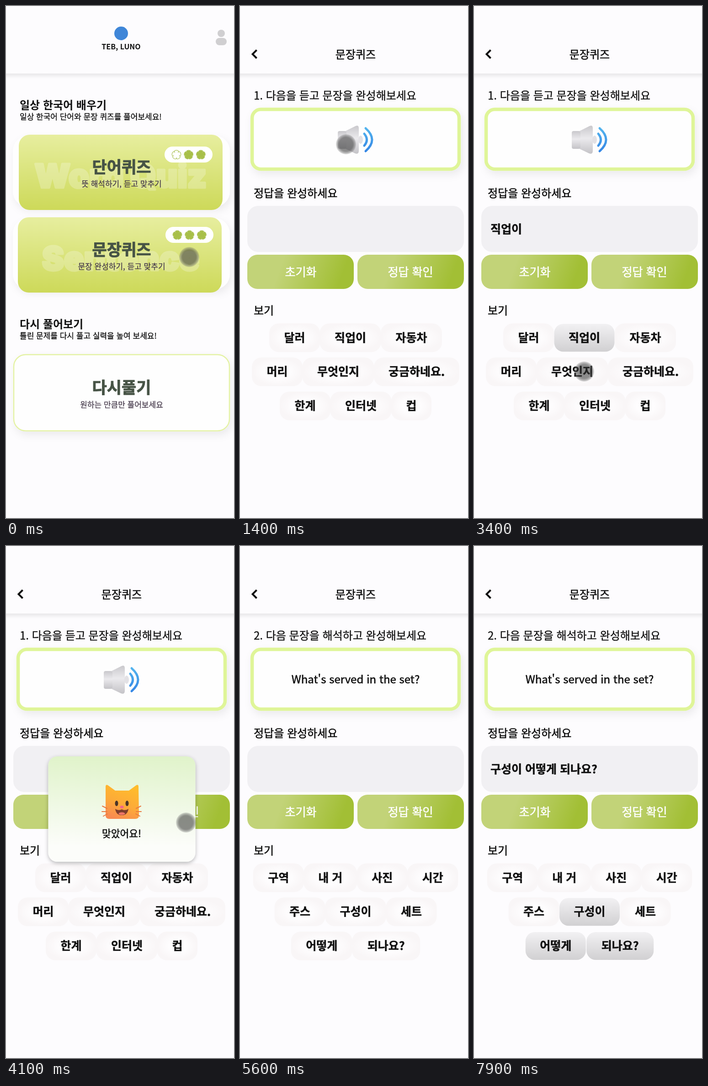
Animation of 499 by 1122 pixels, one loop 8000 ms. Source, as an HTML page:

```html
<!DOCTYPE html>
<html lang="ko">
<head>
<meta charset="utf-8">
<title>문장퀴즈</title>
<style>
  html, body { margin: 0; height: 100%; overflow: hidden; background: #fdfcfe; }
  svg { display: block; width: 100vw; height: 100vh; }
  /* a thin outline in the ink colour gives the in-between weights */
  text {
    --ink: #111; fill: var(--ink); stroke: var(--ink); stroke-width: .6; stroke-linejoin: round;
    font-family: "Noto Sans CJK KR", "Noto Sans CJK", "Noto Sans KR", sans-serif; white-space: pre;
  }
  .mid { text-anchor: middle; }
  .bold { font-weight: 700; stroke-width: 0; }
  .word { font-weight: 700; stroke-width: .5; }
  .sub { stroke-width: .35; }
  .title { font-weight: 700; stroke-width: 1; --ink: #465345; }
  .note { stroke-width: .25; --ink: #44384a; }
  .white { --ink: #fff; }
  .mark { font-family: Inter, sans-serif; font-weight: 900; --ink: #fff; stroke-width: 5; }
</style>
</head>
<body>
<svg viewBox="0 0 499 1122" preserveAspectRatio="none">
  <defs>
    <linearGradient id="lime" x2="0" y2="1"><stop stop-color="#e7ee9f"/><stop offset="1" stop-color="#cdd959"/></linearGradient>
    <linearGradient id="button" x2="1" y2=".12"><stop offset=".35" stop-color="#c2d378"/><stop offset=".95" stop-color="#a2bf35"/></linearGradient>
    <linearGradient id="picked" x2="0" y2="1"><stop stop-color="#f2f1f3"/><stop offset="1" stop-color="#d1d0d2"/></linearGradient>
    <radialGradient id="idle"><stop offset=".45" stop-color="#fefdfe"/><stop offset="1" stop-color="#f9f6f7"/></radialGradient>
    <linearGradient id="popup" x2="0" y2="1"><stop stop-color="#e0f3ca"/><stop offset=".85" stop-color="#fcfdfa"/></linearGradient>
    <linearGradient id="edge" x2="0" y2="1"><stop stop-color="#e9e8ea"/><stop offset="1" stop-color="#fdfcfe"/></linearGradient>
    <linearGradient id="cone" x2="0" y2="1"><stop stop-color="#c9c8cc"/><stop offset=".45" stop-color="#ebeaed"/><stop offset="1" stop-color="#c4c3c7"/></linearGradient>
    <linearGradient id="wave" x2="0" y2="1"><stop stop-color="#53b4ee"/><stop offset="1" stop-color="#3587e5"/></linearGradient>
    <linearGradient id="fur" x1=".7" x2=".3" y2="1"><stop stop-color="#ffbc2c"/><stop offset=".55" stop-color="#fdab38"/><stop offset="1" stop-color="#f88a50"/></linearGradient>
    <radialGradient id="tap"><stop offset=".68" stop-color="#333" stop-opacity=".56"/><stop offset=".82" stop-color="#555" stop-opacity=".5"/><stop offset="1" stop-color="#666" stop-opacity=".2"/></radialGradient>
    <filter id="soft" x="-20%" y="-30%" width="140%" height="170%"><feDropShadow dx="4" dy="8" stdDeviation="9" flood-opacity=".07"/></filter>
    <filter id="lift" x="-20%" y="-20%" width="140%" height="140%"><feDropShadow dx="0" dy="3" stdDeviation="4" flood-opacity=".28"/></filter>
  </defs>
  <rect width="499" height="1122" fill="#fdfcfe"/>
  <rect y="148" width="499" height="11" fill="url(#edge)"/>
  <g id="page"></g>
  <circle id="cursor" r="22" fill="url(#tap)"/>
</svg>
<script>
const LOOP = 8000;
const page = document.getElementById('page');
const cursor = document.getElementById('cursor');

const text = (x, y, size, str, cls = '') =>
  `<text x="${x}" y="${y}" font-size="${size}" class="${cls}">${str}</text>`;
const box = (x, y, w, h, r, fill, extra = '') =>
  `<rect x="${x}" y="${y}" width="${w}" height="${h}" rx="${r}" fill="${fill}" ${extra}/>`;

function flower(cx, cy, filled) {
  const point = (a, r) => `${(cx + r * Math.sin(a)).toFixed(1)} ${(cy - r * Math.cos(a)).toFixed(1)}`;
  const step = Math.PI / 5;
  let d = 'M' + point(-step, 6.5);
  for (let i = 0; i < 5; i++) {
    const a = i * 2 * step;
    d += `C${point(a - .62, 14)} ${point(a + .62, 14)} ${point(a + step, 6.5)}`;
  }
  return `<path d="${d}Z" fill="${filled ? '#a8bf49' : '#fff'}" stroke="#b3c765" stroke-width="1.3" stroke-linejoin="round"/>`;
}

function quizCard(x, y, mark, title, note, badgeX, badgeY, earned) {
  const flowers = [0, 1, 2].map(i => flower(badgeX + 26 + i * 26.7, badgeY + 18, i >= 3 - earned)).join('');
  return box(15, y + 2, 475, 156, 34, '#fefefe', 'filter="url(#soft)"')
    + box(x, y, 446, 165, 24, 'url(#lime)')
    + `<g opacity=".24">${text(251, y + 116, 72, mark, 'mark mid')}</g>`
    + box(badgeX, badgeY, 105, 35, 17.5, '#fff') + flowers
    + text(253, y + 84, 35, title, 'title mid') + text(253, y + 114, 17, note, 'note mid');
}

function home() {
  return '<circle cx="252" cy="60" r="15" fill="#3f86d8"/>'
    + text(252, 95, 16, 'TEB, LUNO', 'bold mid')
    + '<circle cx="471" cy="60" r="8" fill="#d0cfd1"/>' + box(459, 70, 24, 16, 8, '#d0cfd1')
    + text(30, 226, 24, '일상 한국어 배우기', 'bold')
    + text(30, 249, 17, '일상 한국어 단어와 문장 퀴즈를 풀어보세요!', 'sub')
    + quizCard(28, 282, 'Word Quiz', '단어퀴즈', '뜻 해석하기, 듣고 맞추기', 347, 308, 2)
    + quizCard(26, 463, 'Sentence', '문장퀴즈', '문장 완성하기, 듣고 맞추기', 349, 484, 3)
    + text(30, 706, 24, '다시 풀어보기', 'bold')
    + text(30, 729, 17, '틀린 문제를 다시 풀고 실력을 높여 보세요!', 'sub')
    + box(17, 764, 472, 167, 26, '#fefefe', 'stroke="#e4f2a4" stroke-width="2.5" filter="url(#soft)"')
    + text(253, 849, 35, '다시풀기', 'title mid')
    + text(253, 880, 17, '원하는 만큼만 풀어보세요', 'note mid');
}

const speaker = `
  <path d="M231 274L253 263Q260 260 260 268V317Q260 326 252 323L231 313Z" fill="url(#cone)"/>
  <rect x="214" y="274" width="19" height="39" rx="4" fill="url(#cone)"/>
  <ellipse cx="264" cy="293" rx="5" ry="9" fill="#e2e1e5"/>
  <path d="M272 280Q283 293 272 306M275 268Q303 293 275 318" fill="none" stroke="url(#wave)" stroke-width="5" stroke-linecap="round"/>`;

const QUESTIONS = [
  { label: '1. 다음을 듣고 문장을 완성해보세요', prompt: speaker,
    rows: ['달러|직업이|자동차', '머리|무엇인지|궁금하네요.', '한계|인터넷|컵'] },
  { label: '2. 다음 문장을 해석하고 완성해보세요',
    prompt: text(253, 301, 24, "What's served in the set?", 'mid'),
    rows: ['구역|내 거|사진|시간', '주스|구성이|세트', '어떻게|되나요?'] },
];

const GLYPH = { ' ': 6, '.': 7, '?': 15 };
const chipWidth = word => [...word].reduce((sum, c) => sum + (GLYPH[c] || 23), 63);

function chipRow(words, y, picked) {
  const gap = 1.5;
  let x = 253 - (words.reduce((sum, w) => sum + chipWidth(w) + gap, -gap)) / 2;
  return words.map(word => {
    const w = chipWidth(word);
    const chip = box(x, y, w, 61, 20, picked.includes(word) ? 'url(#picked)' : 'url(#idle)',
        picked.includes(word) ? '' : 'stroke="#f9f6f7" stroke-width="2"')
      + text(x + w / 2, y + 39, 25, word, 'word mid');
    x += w + gap;
    return chip;
  }).join('');
}

const header = '<path d="M36.5 96.5L27.5 105.5L36.5 114.5" fill="none" stroke="#111" stroke-width="4"/>'
  + text(253, 115, 24, '문장퀴즈', 'mid');

function quiz({ label, prompt, rows }, picked) {
  return header + text(30, 205, 24, label, 'sub')
    + box(26.5, 226.5, 453, 131, 19, '#fefefe', 'stroke="#dff598" stroke-width="7.5" filter="url(#soft)"') + prompt
    + text(30, 419, 24, '정답을 완성하세요')
    + box(16, 438, 474, 101, 24, '#f1f0f3') + text(36, 498, 25, picked.join(' '), 'word')
    + box(16, 545, 233, 75, 22, 'url(#button)') + box(257, 545, 233, 75, 22, 'url(#button)')
    + text(133, 592, 25, '초기화', 'white mid')
    + text(373, 592, 25, '정답 확인', 'white mid')
    + text(30, 676, 24, '보기')
    + rows.map((row, i) => chipRow(row.split('|'), 696.5 + i * 74.7, picked)).join('');
}

const popup = box(92.5, 461, 322, 231, 20, 'url(#popup)', 'filter="url(#lift)"') + `
  <path d="M218 590V528Q218 521 224 525L239 536H269L284 525Q290 521 290 528L291 590Q291 598 283 598H226Q218 598 218 590Z" fill="url(#fur)"/>
  <path d="M211 570L221 575M210 582H221M213 592L222 587M295 570L285 575M296 582H285M293 592L284 587" stroke="#e8793f" stroke-width="2" stroke-linecap="round"/>
  <ellipse cx="242" cy="564" rx="3.5" ry="6" fill="#4a3428"/><ellipse cx="265" cy="564" rx="3.5" ry="6" fill="#4a3428"/>
  <ellipse cx="253.5" cy="572" rx="4" ry="3" fill="#f2668b"/>
  <path d="M239 576Q246 581 253.5 577Q261 581 268 576Q266 590 253.5 590Q241 590 239 576Z" fill="#7d3d2c"/>
  <ellipse cx="253.5" cy="586.5" rx="7" ry="3" fill="#ee7568"/>`
  + text(253, 638, 21.5, '맞았어요!', 'mid');

const first = (...picked) => () => quiz(QUESTIONS[0], picked);
const second = (...picked) => () => quiz(QUESTIONS[1], picked);

// Each scene holds from its start time until the next one.
const SCENES = [
  [0, home],
  [800, () => ''],
  [1000, first()],
  [2800, first('직업이')],
  [3500, first('직업이', '무엇인지')],
  [3800, first('직업이', '무엇인지', '궁금하네요.')],
  [4050, () => first()() + popup],
  [4900, () => header],
  [5000, second()],
  [6400, second('구성이')],
  [7000, second('구성이', '어떻게')],
  [7500, second('구성이', '어떻게', '되나요?')],
];

// x, y, press time, release time
const TAPS = [
  [401, 550, 0, 200], [232, 303, 1300, 1900], [241, 727, 2600, 2800],
  [241, 801, 3300, 3500], [387, 801, 3650, 3800], [394, 606, 3950, 4250],
  [253, 801, 6250, 6400], [179, 876, 6850, 7000], [320, 876, 7350, 7500],
];

let shown;
function draw() {
  const t = performance.now() % LOOP;
  const scene = SCENES.findLast(([start]) => start <= t);
  if (scene !== shown) {
    shown = scene;
    page.innerHTML = scene[1]();
  }
  const tap = TAPS.find(([, , from, to]) => t >= from && t < to);
  cursor.setAttribute('visibility', tap ? 'visible' : 'hidden');
  if (tap) cursor.setAttribute('transform', `translate(${tap[0]} ${tap[1]})`);
  requestAnimationFrame(draw);
}
draw();
</script>
</body>
</html>
```
